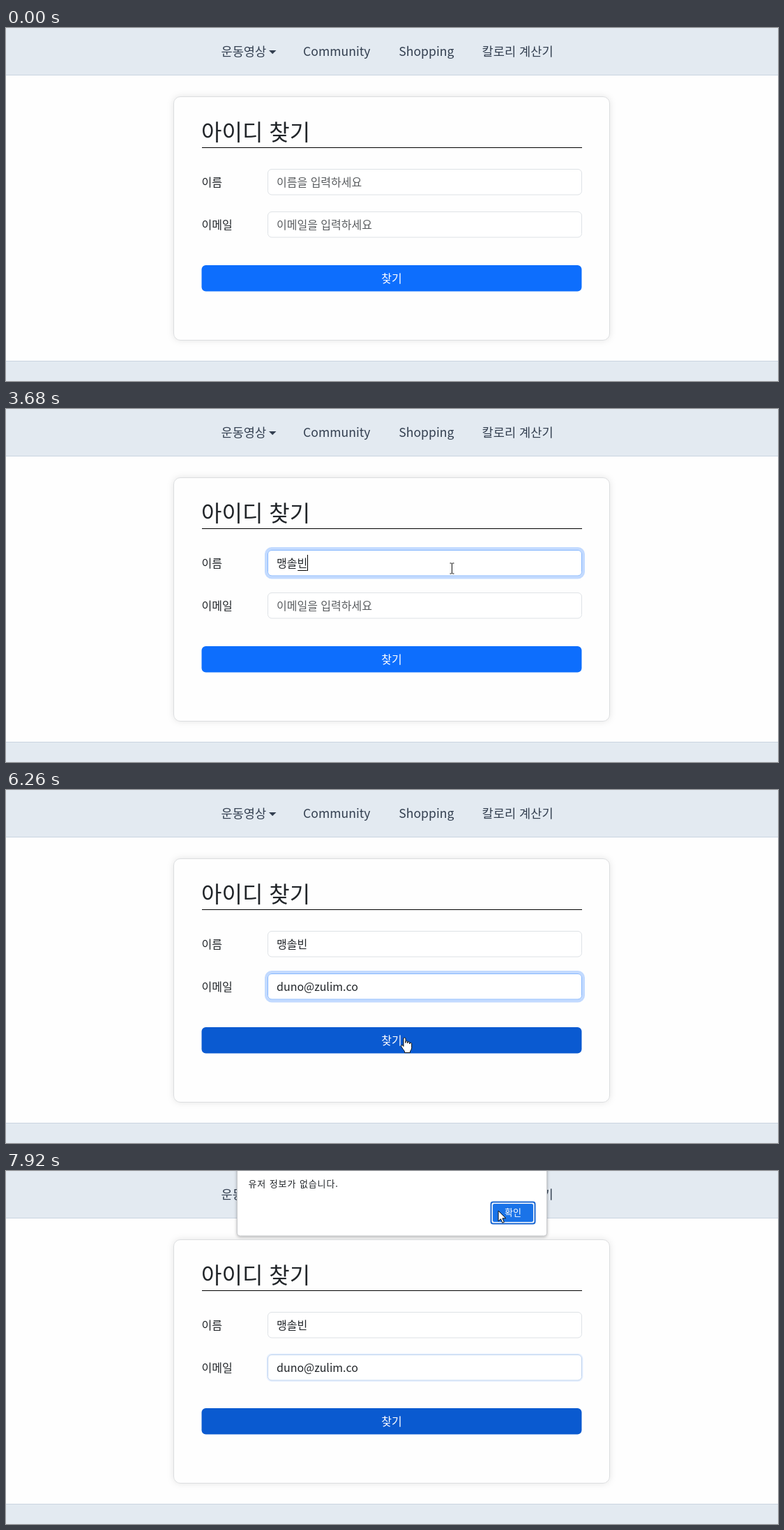
An HTML page for the animation above (7990 ms loop, 1107 px wide and 506 px high).

```html
<!DOCTYPE html>
<html lang="ko">
<head>
<meta charset="utf-8">
<title>아이디 찾기</title>
<style>
  html, body { margin: 0; width: 100%; height: 100%; overflow: hidden; background: #fefefe; }
  svg { display: block; width: 1107px; height: 506px; }
  text { font: 400 16px "Noto Sans CJK KR", "Noto Sans CJK", "Noto Sans", sans-serif; fill: #212529; white-space: pre; }
  .nav text { font-size: 17.6px; font-weight: 500; fill: #333f50; }
  .title { font-size: 32px; }
  .hint { fill: #595c5f; }
  .go { font-weight: 500; fill: #fff; text-anchor: middle; }
  .card { fill: #fefefe; stroke: #dcdee0; filter: drop-shadow(0 0 5px rgba(0,0,0,.1)); }
  .box { fill: #fff; }
  .ring { fill: none; stroke: #0d6efd; }
  .panel { fill: #fff; stroke: #c9cbce; filter: drop-shadow(0 1px 2px rgba(0,0,0,.3)); }
  .msg { font-size: 13px; letter-spacing: .9px; }
  .ok { font-size: 13px; fill: #fff; text-anchor: middle; }
  .point { fill: #fff; stroke: #111; stroke-width: 1; stroke-linejoin: round; }
</style>
</head>
<body>
<svg viewBox="0 0 1107 506">
  <rect width="1107" height="506" fill="#fefefe"/>
  <g class="nav">
    <path d="M0 0H1107V68H0ZM0 477H1107V506H0Z" fill="#e3eaf1"/>
    <path d="M0 67.5H1107M0 477.5H1107" stroke="#c9d4e0"/>
    <text x="308.5" y="40">운동영상</text>
    <path d="M377 32H387.5L382.2 37.2Z" fill="#333f50"/>
    <text x="426" y="40">Community</text>
    <text x="563.3" y="40">Shopping</text>
    <text x="682.6" y="40">칼로리 계산기</text>
  </g>
  <rect class="card" x="240.5" y="98.5" width="625" height="349" rx="9.5"/>
  <text class="title" x="280" y="160.5">아이디 찾기</text>
  <path d="M281 171.5H826" stroke="#000"/>
  <text x="280.5" y="227">이름</text>
  <text x="280.5" y="288">이메일</text>
  <g id="name"></g>
  <g id="mail"></g>
  <path id="under" stroke="#000"/>
  <path id="caret" stroke="#000"/>
  <rect id="submit" x="280.5" y="340" width="545" height="37.5" rx="6"/>
  <text class="go" x="553" y="365">찾기</text>
  <g id="alert">
    <rect class="panel" x="331.5" y="-20" width="444" height="113" rx="4"/>
    <text class="msg" x="347.5" y="23">유저 정보가 없습니다.</text>
    <rect x="695.5" y="44.5" width="63" height="31" rx="3" fill="#fff" stroke="#1a67d2" stroke-width="2"/>
    <rect x="698" y="47" width="58" height="26" rx="2" fill="#1a73e8"/>
    <text class="ok" x="727" y="64">확인</text>
  </g>
  <g id="mouse">
    <path data-kind="arrow" class="point" d="M.5 .5V15.5L4 12.2L6.4 17.8L8.8 16.8L6.4 11.3H11.2Z"/>
    <path data-kind="beam" fill="none" stroke="#111" d="M-3 -7.5H-1L0 -6.7L1 -7.5H3M0 -7V7M-3 7.5H-1L0 6.7L1 7.5H3"/>
    <path data-kind="hand" class="point" stroke-width="1.2" d="M-1.5 13V1.5Q0 -.6 1.5 1.5V8V6Q3 4.6 4.4 6V8.5V7Q5.9 5.6 7.3 7V9.5V8.4Q8.8 7.2 10.2 8.6V15Q10 18 8 20V22H0V20Q-2 17.5 -4.6 13.5Q-5.5 11.2 -3.6 11Q-2.4 11.4 -1.5 13Z"/>
  </g>
</svg>
<script>
const LOOP = 7990, FOCUS1 = 630, FOCUS2 = 4440, PASTE = 4700, ERASE = 5840, PRESS = 6260, ALERT = 6390;
const NS = "http://www.w3.org/2000/svg";
const $ = id => document.getElementById(id);

// Each key press of the name, with the value it leaves behind
const keys = [
  [1330, "ㅁ"], [1460, "매"], [1590, "맹"],
  [1790, "맹ㅅ"], [1860, "맹소"], [1930, "맹솔"],
  [2130, "맹솔ㅂ"], [2220, "맹솔비"], [2600, "맹솔빈"]
];
const address = "duno@zulim.com";

// Pointer stops: time, x, y
const stops = [
  [130, 861, 362], [690, 639, 228], [4080, 639, 228], [4400, 568, 286],
  [4600, 568, 286], [4770, 574, 280], [5910, 574, 280], [6190, 571, 354],
  [6330, 571, 354], [6470, 569, 305], [6600, 564, 141], [6900, 558, 70],
  [7230, 553, 50], [7340, 553, 50], [7900, 705, 56]
];

const clamp = v => Math.max(0, Math.min(1, v));
const smooth = v => v * v * (3 - 2 * v);
const ramp = (t, a, b) => smooth(clamp((t - a) / (b - a)));
const mix = (a, b, k) => "rgb(" + a.map((v, i) => Math.round(v + (b[i] - v) * k)) + ")";

function set(node, attrs) {
  for (const k in attrs) node.setAttribute(k, attrs[k]);
  return node;
}

function makeField(id, y, hint) {
  const add = (tag, attrs) => $(id).appendChild(set(document.createElementNS(NS, tag), attrs));
  const ring = add("rect", { class: "ring" });
  const box = add("rect", { class: "box", x: 375.5, y: y + .5, width: 450, height: 36.5, rx: 5.5 });
  const text = add("text", { x: 388, y: y + 25 });
  return (value, k) => {
    const s = 4 * k;
    set(ring, {
      x: 375 - s / 2, y: y - s / 2, width: 451 + s, height: 37.5 + s, rx: 6 + s / 2,
      "stroke-width": s, "stroke-opacity": .25 * k
    });
    box.setAttribute("stroke", mix([222, 226, 230], [134, 183, 254], k));
    text.textContent = value || hint;
    text.setAttribute("class", value ? "" : "hint");
    return 388 + (value ? text.getComputedTextLength() : 0);
  };
}

const nameField = makeField("name", 202, "이름을 입력하세요");
const mailField = makeField("mail", 263, "이메일을 입력하세요");

function pointerAt(t) {
  let i = 0;
  while (i < stops.length - 2 && t >= stops[i + 1][0]) i++;
  const [a, x, y] = stops[i], [b, u, v] = stops[i + 1];
  const k = ramp(t, a, b);
  return [x + (u - x) * k, y + (v - y) * k];
}

function pointerKind(t, x, y) {
  if (t > 6500) return "arrow";
  if (t > ALERT) return "hand";
  const inside = (left, top, bottom) => x > left && x < 826 && y > top && y < bottom;
  if (inside(375, 202, 239) || inside(375, 263, 300)) return "beam";
  return inside(281, 340, 378) ? "hand" : "arrow";
}

function draw(t) {
  const typed = keys.filter(k => t >= k[0]).pop();
  const name = typed ? typed[1] : "";
  const mail = t < PASTE ? "" : t < ERASE ? address : address.slice(0, -1);
  const moved = ramp(t, FOCUS2, FOCUS2 + 110);
  const nameEnd = nameField(name, ramp(t, FOCUS1, FOCUS1 + 110) - moved);
  const mailEnd = mailField(mail, moved - .62 * ramp(t, PRESS, PRESS + 120));

  const onMail = t >= FOCUS2;
  const last = t >= ERASE ? ERASE : onMail ? FOCUS2 : typed ? typed[0] : FOCUS1;
  const lit = t >= FOCUS1 && t < PRESS && (t - last) % 1000 < 500;
  const cx = Math.floor(onMail ? mailEnd : nameEnd) + .5, cy = onMail ? 270 : 209;
  set($("caret"), { d: `M${cx} ${cy}v23`, opacity: lit ? 1 : 0 });
  set($("under"), { d: `M${nameEnd - 14} 231.5H${nameEnd - .5}`, opacity: name && !onMail ? 1 : 0 });

  const hover = ramp(t, 6150, 6270);
  $("submit").setAttribute("fill", mix([13, 110, 253], [10, 90, 208], hover));

  const shown = clamp((t - ALERT) / 150);
  set($("alert"), {
    opacity: clamp(shown * 1.42),
    transform: `translate(0 ${-20 * (1 - shown)})`
  });

  const [x, y] = pointerAt(t), kind = pointerKind(t, x, y);
  set($("mouse"), { transform: `translate(${Math.round(x) + .5} ${Math.round(y) + .5})`, opacity: t < 130 ? 0 : 1 });
  for (const p of $("mouse").children) p.style.display = p.dataset.kind === kind ? "" : "none";
}

const start = performance.now();
function tick() {
  draw((performance.now() - start) % LOOP);
  requestAnimationFrame(tick);
}
tick();
</script>
</body>
</html>
```
